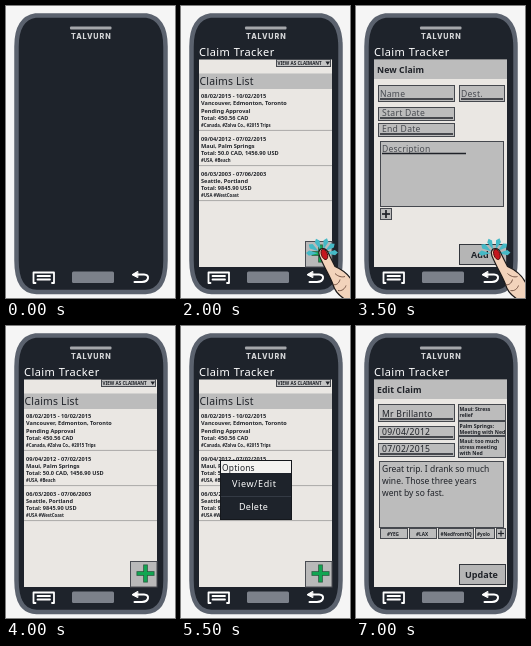
An HTML page that plays this animation: 169 px wide and 292 px high, repeating every 8000 ms.

```html
<!DOCTYPE html>
<html lang="en">
<head>
<meta charset="utf-8">
<title>Claim Tracker</title>
<style>
  html, body { margin: 0; width: 100%; height: 100%; overflow: hidden; background: #f5f5f5; }
  svg { display: block; width: 169px; height: 292px; }
  text { font-family: "Noto Sans", "Open Sans", sans-serif; white-space: pre; }
  .brand { font-family: Inter, "Liberation Sans", sans-serif; font-weight: 800; }
</style>
</head>
<body>
<svg id="stage" viewBox="0 0 169 292"></svg>
<script>
const INK = '#1f2228', DARK = '#1e232b', PAPER = '#eae7e3', GREY = '#bcbcbc', EDGE = '#45484e';

const rect = (x, y, x2, y2, fill, stroke, w = 1) =>
  `<rect x="${x}" y="${y}" width="${x2 - x}" height="${y2 - y}" fill="${fill}"` +
  (stroke ? ` stroke="${stroke}" stroke-width="${w}"` : '') + '/>';

const line = (x, y, x2, y2, color = INK, w = 1) =>
  `<path d="M${x} ${y}L${x2} ${y2}" stroke="${color}" stroke-width="${w}"/>`;

const text = (x, y, size, str, { fill = INK, weight = 500, gap = 0 } = {}) =>
  `<text x="${x}" y="${y}" font-size="${size}" fill="${fill}" font-weight="${weight}" letter-spacing="${gap}">${str}</text>`;

const group = (id, body) => `<g id="${id}" visibility="hidden">${body}</g>`;

const box = (x, y, x2, y2) => rect(x + .5, y + .5, x2 - .5, y2 - .5, GREY, EDGE);

const field = (x, y, x2, y2, label, fill, pad = 2) =>
  box(x, y, x2, y2) + text(x + pad, y2 - 5, 8.6, label, { fill, gap: .25 }) +
  line(x + 2, y2 - 3, x2 - 2, y2 - 3, INK, 1.5);

const button = (x, y, x2, y2, label, tx) =>
  rect(x + .5, y + .5, x2 - .5, y2 - .5, '#b5b5b5', '#33363c') +
  text(tx, y2 - 7.5, 9, label, { weight: 600 });

const plus = (x, y, r, color, w) =>
  line(x - r, y, x + r, y, color, w) + line(x, y - r, x, y + r, color, w);

const phone = `<g transform="translate(.5 .5)">
  <path d="M29 9H140Q159 12 159 40V254Q159 285 139 285.5H30Q10 285 10 254V40Q10 12 29 9Z"
    fill="${DARK}" stroke="#5b626e" stroke-width="4.5"/>
  <rect x="63.5" y="20" width="41.5" height="3" rx="1" fill="#a5a7ab"/>
  <text class="brand" x="84.8" y="32" font-size="7.2" letter-spacing=".9" text-anchor="middle" fill="#d5d6d8">TALVURN</text>
  <rect x="65.5" y="265" width="42" height="11.5" rx="1.5" fill="#7c818a"/>
  <g fill="none" stroke="#fff" stroke-width="1.8" stroke-linecap="round" stroke-linejoin="round">
    <path d="M27 276.5V266H47.5V276.5M31 269.5H43.5M31 273H43.5M27 276.5H29M45.5 276.5H47.5"/>
    <path d="M128 268H137.5Q142 268.5 141.5 271.5Q141 275.3 135.5 275.5H128" stroke-width="2"/>
    <path d="M131 265L125.5 268.2L131 271Z" fill="#fff" stroke-width="1"/>
  </g></g>`;

const header = text(18, 49.5, 11, 'Claim Tracker', { fill: '#fff', weight: 400, gap: .45 }) +
  rect(18, 53.5, 151, 261, PAPER);

const claims = [
  [92, ['08/02/2015 - 10/02/2015', 'Vancouver, Edmonton, Toronto', 'Pending Approval', 'Total: 450.56 CAD'],
    '#Canada, #Zolva Co., #2015 Trips'],
  [134.5, ['09/04/2012 - 07/02/2015', 'Maui, Palm Springs', 'Total: 50.0 CAD, 1456.90 USD'], '#USA, #Beach'],
  [169.5, ['06/03/2003 - 07/06/2003', 'Seattle, Portland', 'Total: 9845.90 USD'], '#USA #WestCoast']
];

const claim = ([y, rows, tags]) => {
  const end = y + rows.length * 7.3;
  return rows.map((row, i) => text(20, y + i * 7.3, 5.6, row, { weight: 600 })).join('') +
    text(20, end, 4.3, tags, { weight: 800 }) +
    line(18, end + 3.2, 151, end + 3.2, '#aaa9a8', 1);
};

const list = header +
  rect(95.5, 53.5, 149.5, 60.5, '#c4c4c4', EDGE) +
  text(96.5, 59, 4.6, 'VIEW AS CLAIMANT', { weight: 600 }) +
  `<path d="M144.5 55.5H149L146.7 59Z" fill="${INK}"/>` +
  rect(18, 67.5, 151, 83, GREY) + text(18.5, 79, 10.4, 'Claims List', { gap: .2 }) +
  claims.map(claim).join('') +
  rect(124.5, 235.5, 151, 261, '#b9b9b9', '#4a4d53') +
  plus(139.5, 247.5, 9, '#245c3c', 4.6) + plus(139.5, 247.5, 8.2, '#12a552', 3);

const titleBar = title =>
  rect(18, 54, 151, 73, GREY) + text(21, 66.5, 8.7, title, { weight: 600, gap: .1 });

const HINT = '#484b51';
const create = header + titleBar('New Claim') +
  field(22, 79, 99, 96, 'Name', HINT) +
  field(103, 79, 149, 96, 'Dest.', HINT) +
  field(22, 101, 99, 115, 'Start Date', HINT, 4) +
  field(22, 117, 99, 131, 'End Date', HINT, 4) +
  box(24, 135, 148, 201) + text(26, 145.5, 8.6, 'Description', { fill: HINT, gap: .2 }) +
  line(26, 147.5, 110, 147.5, INK, 1.5) +
  box(24, 202, 36, 214) + plus(30, 208, 4, INK, 1.7) +
  button(103, 238, 151, 259, 'Add', 115);

const notes = [
  [78, 95, ['Maui: Stress', 'relief']],
  [95, 110, ['Palm Springs:', 'Meeting with Ned']],
  [110, 132, ['Maui: too much', 'stress meeting', 'with Ned']]
];
const tags = [[24, 52, '#YEG', 31], [53, 81, '#LAX', 60], [82, 118, '#NedfromHQ', 84.5], [119, 139, '#yolo', 121]];
const story = ['Great trip. I drank so much', 'wine. Those three years', 'went by so fast.'];

const edit = header + titleBar('Edit Claim') +
  field(22, 78, 99, 96, 'Mr Brillanto', INK, 4) +
  field(22, 100, 99, 114, '09/04/2012', INK, 4) +
  field(22, 117, 99, 131, '07/02/2015', INK, 4) +
  notes.map(([y, y2, rows]) => box(102, y, 150, y2) +
    rows.map((row, i) => text(103.5, y + 7 + i * 5.9, 5.1, row, { weight: 600 })).join('')).join('') +
  box(23, 135, 148, 202) +
  story.map((row, i) => text(26, 145.5 + i * 12.3, 8.5, row)).join('') +
  tags.map(([x, x2, tag, tx]) => box(x, 202, x2, 213) + text(tx, 209.5, 4.7, tag, { weight: 700 })).join('') +
  box(140, 202, 150, 213) + plus(145, 207.5, 3, INK, 1.2) +
  button(103, 238, 150, 259, 'Update', 109);

const menu = rect(39.5, 134.5, 110.5, 193.5, DARK, '#15181d') +
  rect(40, 135, 110, 147, '#f4f3f1') + text(41, 144.5, 8.4, 'Options', { gap: .25 }) +
  line(40, 170.5, 110, 170.5, '#343a44') +
  text(51, 161, 9, 'View/Edit', { fill: '#fff', gap: .6 }) +
  text(58, 184, 9, 'Delete', { fill: '#fff', gap: .3 });

const rays = [-178, -146, -112, -72, -38, -4].map(angle =>
  `<path d="M4 0L13 -2.6L16 0L13 2.6Z" transform="rotate(${angle})"/>`).join('');

// Fingertip at the origin, pointing up and left.
const hand =
  `<g fill="#45b9c6">${rays}</g>
  <path d="M-3 -2C-2 -6 4 -6 6 -1L13 13C20 16 27 21 31 29L70 93L50 103L25 47C18 43 13 39 11 31C9 25 3 15 0 8C-2 4 -4 1 -3 -2Z"
    fill="#f2d3bb" stroke="#1c1a1a" stroke-width="1.2" stroke-linejoin="round"/>
  <path d="M11 31C14 32 17 30 18 26M13 20C16 23 20 24 23 23M16 37C20 38 23 35 24 32" fill="none" stroke="#6b4a3c" stroke-width=".9"/>
  <ellipse cx="2.4" cy="1" rx="3" ry="5.4" transform="rotate(-20 2 1)" fill="#c5161d" stroke="#4a0d10" stroke-width=".9"/>`;

const stage = document.getElementById('stage');
stage.innerHTML = phone + group('list', list) + group('create', create) +
  group('edit', edit) + group('menu', menu) + group('hand', hand);

// start ms, visible layers, hand placement
const steps = [
  [0, []],
  [1000, ['list']],
  [2000, ['list'], 'translate(141 247.5)'],
  [2500, ['create']],
  [3500, ['create'], 'translate(138.5 247.5)'],
  [4000, ['list']],
  [5000, ['list'], 'translate(40 152) rotate(152)'],
  [5500, ['list', 'menu']],
  [6500, ['list', 'menu'], 'translate(72 158) rotate(152)'],
  [7000, ['edit']]
];
const LOOP = 8000;
const layers = ['list', 'create', 'edit', 'menu', 'hand'].map(id => document.getElementById(id));
const handLayer = document.getElementById('hand');
const begin = performance.now();
let shown;

function draw() {
  const t = (performance.now() - begin) % LOOP;
  const step = steps.findLast(s => s[0] <= t);
  if (step !== shown) {
    shown = step;
    const [, ids, place] = step;
    for (const layer of layers) {
      const on = layer === handLayer ? place : ids.includes(layer.id);
      layer.setAttribute('visibility', on ? 'visible' : 'hidden');
    }
    if (place) handLayer.setAttribute('transform', place);
  }
  requestAnimationFrame(draw);
}
draw();
</script>
</body>
</html>
```
